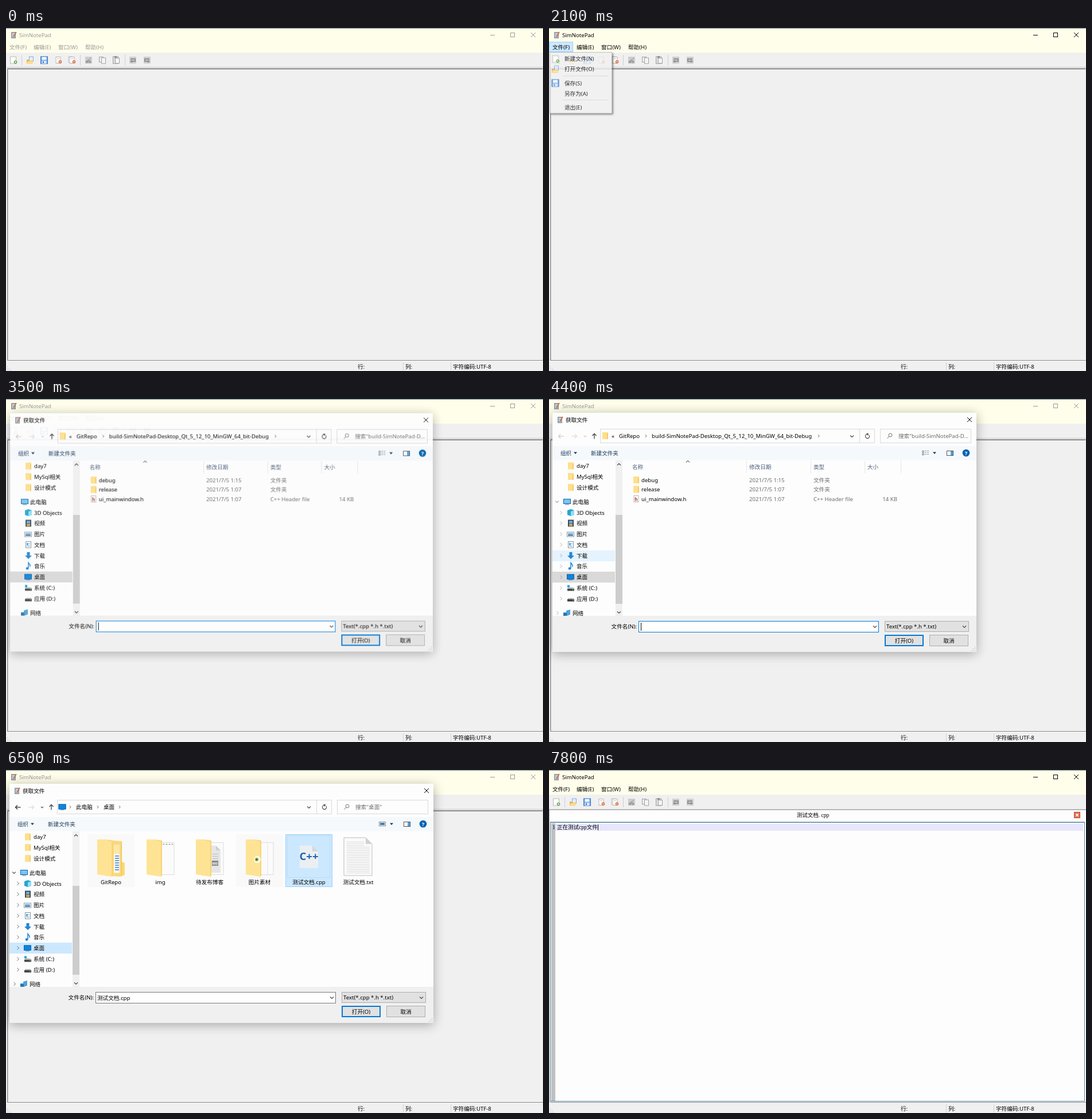
Write an HTML page with a canvas that moves like this. It is 936 px wide and 598 px high and loops after 8 s.

```html
<!DOCTYPE html>
<html lang="zh">
<head>
<meta charset="utf-8">
<title>SimNotePad</title>
<style>
html, body { margin: 0; width: 936px; height: 598px; overflow: hidden; background: #f0f0f0 }
canvas { position: absolute; left: 0; top: 0 }
#top { transform-origin: 375.5px 232.5px }
</style>
</head>
<body>
<canvas id="base" width="936" height="598"></canvas>
<canvas id="top" width="936" height="598"></canvas>
<script>
const base = document.getElementById('base').getContext('2d');
const top2d = document.getElementById('top').getContext('2d');
const UI = '9.6px "Noto Sans","Noto Sans CJK SC","Noto Sans CJK",sans-serif';
const EDIT = '9.5px "Liberation Serif","Noto Sans CJK SC","Noto Sans CJK",serif';
const BLUE = '#0078d7', GREY = '#6d6d6d';
let g = base;

// Drawing helpers
function box(x, y, w, h, fill, edge, lw = 1) {
  if (fill) { g.fillStyle = fill; g.fillRect(x, y, w, h); }
  if (edge) {
    g.strokeStyle = edge; g.lineWidth = lw;
    g.strokeRect(x + lw / 2, y + lw / 2, w - lw, h - lw);
  }
}
function path(pts) {
  g.beginPath();
  for (let i = 0; i < pts.length; i += 2) g.lineTo(pts[i], pts[i + 1]);
}
function line(color, lw, ...pts) {
  path(pts); g.strokeStyle = color; g.lineWidth = lw; g.stroke();
}
function poly(fill, ...pts) { path(pts); g.fillStyle = fill; g.fill(); }
function dot(x, y, r, fill, edge) {
  g.beginPath(); g.arc(x, y, r, 0, 7);
  if (fill) { g.fillStyle = fill; g.fill(); }
  if (edge) { g.strokeStyle = edge; g.lineWidth = 1; g.stroke(); }
}
// y is the visual middle of the line
function text(s, x, y, color = '#000', align = 'left', font = UI) {
  g.font = font; g.textAlign = align; g.fillStyle = color;
  g.fillText(s, x, y + 3.5);
}
function cross(x, y, r, color, lw = 1) {
  line(color, lw, x - r, y - r, x + r, y + r);
  line(color, lw, x + r, y - r, x - r, y + r);
}
const down = (x, y, c = '#444', r = 3) => line(c, 1.1, x - r, y - r / 2, x, y + r / 2, x + r, y - r / 2);
const up = (x, y, c = '#444', r = 3) => line(c, 1.1, x - r, y + r / 2, x, y - r / 2, x + r, y + r / 2);
const right = (x, y, c = '#555', r = 2.2) => line(c, 1, x - r / 2, y - r, x + r / 2, y, x - r / 2, y + r);
const triangle = (x, y) => poly('#1e395b', x - 3, y - 1.5, x + 3, y - 1.5, x, y + 2);
function arrow(x, y, dir, c) {
  line(c, 1.3, x - 4.5, y, x + 4.5, y);
  line(c, 1.3, x + dir, y - 3.5, x + dir * 4.5, y, x + dir, y + 3.5);
}

// Small icons, centred on x, y
function page(x, y, w = 9, h = 12, edge = '#b5b5b5', fill = '#fff') {
  box(x - w / 2, y - h / 2, w, h, fill, edge);
}
const badge = (x, y, c) => { dot(x, y, 2.8, c); box(x - 1.5, y - .5, 3, 1, '#fff'); };
function newIcon(x, y) {
  page(x - 1, y, 11, 13);
  badge(x + 3, y + 3.5, '#5fa548'); box(x + 2.5, y + 2, 1, 3, '#fff');
}
function openIcon(x, y) {
  page(x + 2, y - 2, 8, 9, '#82abe4', '#e3eeff');
  poly('#e9b64a', x - 6, y - 1, x - 2, y - 1, x - 1, y + 1, x + 6, y + 1, x + 4, y + 6, x - 6, y + 6);
  poly('#ffe18c', x - 4, y + 2, x + 6.5, y + 2, x + 4, y + 5.5, x - 6, y + 5.5);
}
function saveIcon(x, y) {
  box(x - 6.5, y - 6.5, 13, 13, '#6ba4ea', '#3d78c6');
  box(x - 4, y - 5.5, 8, 5, '#f2f7ff'); box(x - 4, y + 1, 8, 5, '#dbe8f8');
  box(x - 2.5, y + 2, 2, 3, '#3d78c6');
}
function closeIcon(x, y, two) {
  if (two) page(x - 3, y - 1, 7, 11);
  page(x, y, 9, 12);
  line('#c4c4c4', 1, x - 2, y - 2.5, x + 2, y - 2.5);
  badge(x + 3.5, y + 3, '#e4703c');
}
function greyIcon(x, y, kind) {
  const c = '#a2a2a2';
  if (kind == 'cut') {
    box(x - 6, y - 6, 12, 12, '#cdcdcd');
    line('#8c8c8c', 1, x - 3, y + 3, x + 4, y - 4); line('#999', 1, x + 3, y + 3, x - 2, y - 2);
    dot(x - 3, y + 3, 1.7, null, '#808080'); dot(x + 2, y + 3, 1.7, null, '#808080');
  } else if (kind == 'copy') {
    page(x - 2, y - 1, 8, 10, c, '#eee'); page(x + 2, y + 1, 8, 11, c, '#f5f5f5');
  } else if (kind == 'paste') {
    page(x - 1, y, 10, 13, c, '#dcdcdc'); box(x - 3, y - 7, 4, 3, '#909090');
    page(x + 2, y + 1, 8, 10, c, '#f5f5f5');
  } else {
    const d = kind == 'undo' ? 1 : -1;
    box(x - 6, y - 6, 12, 12, '#cfcfcf');
    line('#909090', 2, x - d * 4, y - 2, x + d * 4, y - 2, x + d * 4, y + 2, x - d * 2, y + 2);
    poly('#909090', x - d * 1, y - 1, x - d * 5, y + 2, x - d * 1, y + 5);
  }
}
function appIcon(x, y) {
  box(x - 4, y - 5, 8, 11, '#a3b3c1', '#8a949d');
  line('#fff', 1, x - 2, y - 1.5, x + 2, y - 1.5); line('#fff', 1, x - 2, y + 1.5, x + 2, y + 1.5);
  line('#d4683a', 1.6, x, y + 3, x + 5, y - 5);
}
function folder(x, y) {
  box(x - 5, y - 6, 10, 12, '#ffdf8b'); box(x + 3, y - 4, 2, 10, '#f3cc6a');
}
function screen(x, y, c = '#1283d9') {
  box(x - 6, y - 5, 13, 9, c, '#0867ad'); box(x - 3, y + 4.5, 7, 1, '#5e87a6');
}

// Main window
function windowFrame(t) {
  const active = t >= 2100 && t < 3200 || t >= 7500;
  const ink = active ? '#000' : '#999';
  g = base;
  box(0, 0, 936, 598, '#f0f0f0');
  box(0, 0, 936, 43, '#fffeea');
  box(0, 0, 936, 1, '#718b8f');
  appIcon(13, 12);
  text('SimNotePad', 23, 12, ink);
  box(844, 12, 8, 1, ink); box(879, 8, 8, 8, null, ink); cross(919, 12, 4, ink);
  if (t >= 1700 && t < 2100) box(0, 24, 42, 18, '#e5f3ff', '#cce8ff');
  if (t >= 2100 && t < 3200) box(0, 24, 42, 18, '#cce8ff', '#99d1ff');
  ['文件(F)', '编辑(E)', '窗口(W)', '帮助(H)'].forEach((s, i) => text(s, [6, 48, 91, 138][i], 33.5, ink));

  if (t >= 1300 && t < 1700) box(1, 44, 25, 23, '#e5f3ff', '#cce8ff');
  newIcon(13.5, 56); openIcon(42, 56); saveIcon(66.5, 56); closeIcon(91, 56); closeIcon(115, 56, true);
  ['cut', 'copy', 'paste', 'undo', 'redo'].forEach((k, i) => greyIcon([144, 168, 192, 221, 246][i], 56, k));
  for (const x of [27, 129, 207]) box(x, 47, 1, 18, '#cfcfcf');
  box(0, 68, 936, 1, '#c4c4c4'); box(0, 69, 936, 1, '#fafafa');

  if (t >= 7600) editor();
  else {
    box(2, 70, 934, 511, null, '#a0a0a0'); box(2, 71, 933, 1, '#747474');
    box(2, 71, 1, 509, '#858585'); box(3, 72, 1, 507, '#c4c4c4');
    box(935, 71, 1, 509, '#e3e3e3');
  }
  box(2, 579, 934, 1, '#858585'); box(0, 580, 936, 1, '#fafafa');
  box(692, 583, 1, 14, '#d2d2d2'); box(775, 583, 1, 14, '#d2d2d2');
  text('行:', 613, 590); text('列:', 696, 590); text('字符编码:UTF-8', 779, 590);
  for (const [x, y] of [[2, 590], [2, 593], [2, 596], [5, 593], [5, 596], [8, 596]]) box(x, y, 1, 1, '#aaa');
}
function editor() {
  box(0, 69, 936, 511, '#fdfdfd'); box(0, 69, 936, 1, '#a8a8a8'); box(0, 70, 1, 510, '#b5b5b5');
  text('测试文档. cpp', 460, 78.5, '#000', 'center', EDIT);
  box(915, 73, 11, 11, '#e0704f', '#b9553a'); cross(920.5, 78.5, 2.2, '#fff', 1.4);
  box(2, 90, 932, 1, '#a8b8c0'); box(2, 91, 932, 487, '#fdfdfd', '#4c86a5');
  box(4, 93, 7, 484, '#c0c0c0');
  box(11, 94, 920, 12, '#e8e6fd');
  text('1', 6, 99.5, '#000', 'left', EDIT);
  text('正在测试cpp文件', 14, 99.5, '#000', 'left', EDIT);
  box(85, 95, 1, 10, '#000');
}

function menu(t) {
  g.shadowColor = 'rgba(0,0,0,.5)'; g.shadowBlur = 3; g.shadowOffsetX = g.shadowOffsetY = 2;
  box(1, 42, 109, 107, '#f2f2f2');
  g.shadowColor = 'transparent';
  box(1, 42, 109, 107, null, '#b5b5b5');
  if (t >= 2400) box(2, t < 2900 ? 44 : 62, 105, 18, '#91c9f7');
  newIcon(12, 54); openIcon(11, 72); saveIcon(11, 96);
  ['新建文件(N)', '打开文件(O)', '保存(S)', '另存为(A)', '退出(E)'].forEach((s, i) => text(s, 27, [53, 71, 96, 114, 138.5][i]));
  box(24, 83, 80, 1, '#d7d7d7'); box(24, 125, 80, 1, '#d7d7d7');
}

// File dialog
const tree = [
  ['day7', 116.5], ['MySql相关', 135], ['设计模式', 154], ['此电脑', 179], ['3D Objects', 198], ['视频', 216.5], ['图片', 235.5],
  ['文档', 254], ['下载', 273], ['音乐', 291.5], ['桌面', 310.5], ['系统 (C:)', 329.5], ['应用 (D:)', 348], ['网络', 373]
];
function treeIcon(i, y) {
  if (i < 3) folder(38, y);
  else if (i == 3) screen(31, y, '#7cc4ec');
  else if (i == 4) {
    poly('#27a5cf', 32, y - 4, 38, y - 6, 44, y - 4, 44, y + 4, 38, y + 6, 32, y + 4);
    poly('#8fe0f5', 38, y - 2, 44, y - 4, 44, y + 4, 38, y + 6);
  } else if (i == 5) {
    box(33, y - 6, 10, 12, '#3a4b5c'); box(35, y - 4, 6, 4, '#6db2e8'); box(35, y + 1, 6, 4, '#d3a94c');
  } else if (i == 6) {
    box(31, y - 4, 13, 9, '#fff', '#8c9aa5'); box(33, y - 2, 9, 3, '#79bce8'); box(33, y + 1, 9, 2, '#37688c');
  } else if (i == 7) {
    page(38, y, 10, 12, '#8294a5'); box(35, y - 3, 3, 4, '#59a2d6');
    box(35, y + 2, 6, 1, '#59a2d6'); box(39, y - 2, 2, 1, '#59a2d6');
  } else if (i == 8) {
    poly('#2586d3', 35.5, y - 6, 40.5, y - 6, 40.5, y, 44, y, 38, y + 6, 32, y, 35.5, y);
  } else if (i == 9) {
    line('#1786d8', 1.5, 38, y + 4, 38, y - 6, 41, y - 2, 41, y + 1); dot(36, y + 4, 2.3, '#1786d8');
  } else if (i == 10) screen(37, y);
  else if (i < 13) {
    box(32, y + 1, 12, 4, '#444'); poly('#bbb', 34, y - 1, 42, y - 1, 44, y + 1, 32, y + 1);
    box(41, y + 2, 2, 1, '#6f6');
    if (i == 11) box(32, y - 5, 4, 4, '#1ba0e2');
  } else {
    poly('#4fa3d8', 25, y - 1, 30, y - 1, 30, y - 4, 37, y - 6, 37, y + 3, 31, y + 5, 25, y + 5);
    poly('#2a76aa', 25, y, 31, y, 31, y + 5, 25, y + 5);
  }
}
function hoverRow(t) {
  if (t < 4300 || t >= 5600) return -1;
  return t < 4400 ? 7 : t < 4500 ? 8 : t < 4600 ? 10 : t < 4800 ? 11 : t < 5000 ? 12 : t < 5100 ? 11 : 10;
}
function sidebar(t) {
  const hover = hoverRow(t);
  const chevron = t < 4300 || t >= 6900 ? 0 : t < 4500 ? .5 : t < 6600 ? 1 : (6900 - t) / 400;
  tree.forEach(([name, y], i) => {
    const row = i == 10 ? (t < 5100 || t >= 6600 ? '#d9d9d9' : '#cce8ff') : i == hover ? '#e5f3ff' : null;
    if (row) box(6, Math.round(y - 9.3), 109, 19, row, i == 10 && hover == 10 && t >= 5100 ? '#99d1ff' : null);
    treeIcon(i, y);
    text(name, i == 3 || i == 13 ? 41 : 48, y);
    if (i > 2) {
      g.globalAlpha = chevron;
      if (i == 3) down(14, y, '#444', 2.8); else right(i == 13 ? 15 : 21, y, '#666', 3);
      g.globalAlpha = 1;
    }
  });
}
function fileList() {
  const head = '#4c607a';
  ['名称', '修改日期', '类型', '大小'].forEach((s, i) => text(s, [145, 349, 461, 555][i], 118, head));
  for (const x of [344, 456, 550, 613]) box(x, 108, 1, 21, '#e5e5e5');
  up(242, 109, '#777');
  [['debug', '1:15', '文件夹'], ['release', '1:07', '文件夹'], ['ui_mainwindow.h', '1:07', 'C++ Header file']].forEach(([name, time, kind], i) => {
    const y = 141 + i * 16.5;
    if (i < 2) folder(152, y);
    else { page(152, y, 9, 12); text('h', 152, y, '#b33a3a', 'center', 'bold 8px "Noto Sans",sans-serif'); }
    text(name, 161, y); text('2021/7/5 ' + time, 349, y, GREY); text(kind, 461, y, GREY);
  });
  text('14 KB', 607, 174, GREY, 'right');
}
// An open folder: contents to the right, the yellow cover in front
function bigFolder(x, i) {
  if (i == 0) {
    poly('#fbd878', x + 14, 122, x + 43, 124, x + 43, 160, x + 48, 162, x + 48, 183, x + 40, 186, x + 14, 184);
    box(x + 29, 130, 10, 50, '#fbe7ab');
    box(x + 29, 146, 10, 33, '#f8fafc');
    for (let y = 149; y < 176; y += 4) box(x + 31, y, 7, 2, '#6b9ccb');
    line('#e9bd55', 1, x + 42.5, 126, x + 42.5, 184);
  } else {
    poly('#fbfbfb', x + 20, 125, x + 48, 127, x + 48, 182, x + 20, 184);
    line('#dcdcdc', 1, x + 24, 126.5, x + 48, 126.5, x + 48, 182.5, x + 24, 182.5);
    if (i == 1) {
      box(x + 26, 128, 22, 3, '#eee');
      for (let k = 0; k < 4; k++) box(x + 29 + k * 5, 129, 2, 1, '#888');
    }
    if (i == 2) {
      poly('#e6e6e6', x + 24, 132, x + 35, 132, x + 43, 140, x + 43, 179, x + 24, 179);
      poly('#cfcfcf', x + 35, 132, x + 43, 140, x + 35, 140);
      for (let y = 146; y < 157; y += 4) box(x + 29, y, 10, 1, '#bbb');
      box(x + 28, 158, 11, 9, '#8a8a8a');
      text('MD', x + 33.5, 161.5, '#fff', 'center', 'bold 5.5px "Noto Sans",sans-serif');
    }
    if (i == 3) line('#e4e4e4', 1, x + 38, 128, x + 38, 182);
  }
  poly('#ffe394', x, 121, x + 13, 121, x + 25, 124, x + 25, 186, x, 182);
  poly('#f7d375', x + 13, 121, x + 27, 123, x + 27, 184, x + 25, 186, x + 25, 125);
  if (i == 3) {
    dot(x + 20, 156, 6, '#fdfdfd'); dot(x + 19, 156, 3.2, '#9cb83a'); dot(x + 19, 156, 1.2, '#333');
  }
}
function thumbnails(t) {
  const hover = t < 5700 ? -1 : t < 5800 ? 2 : t < 6000 ? 3 : t < 6800 ? 4 : -1;
  ['GitRepo', 'img', '待发布博客', '图片素材', '测试文档.cpp', '测试文档.txt'].forEach((name, i) => {
    const x = Math.round(142 + i * 86.2), mid = x + 41;
    const picked = i == 4 && t >= 6500;
    if (picked) box(x, 112, 82, 92, '#cce8ff', hover == 4 ? '#99d1ff' : null);
    else if (i == 0 && t < 6500) box(x, 112, 82, 92, '#d9d9d9');
    else if (hover == i) box(x, 112, 82, 92, '#e5f3ff');
    else if ((i == 0 || i == 3) && t >= 6500 && t < 6600) box(x, 112, 82, 92, '#f9f9f9');
    if (i < 4) bigFolder(x + 17, i);
    if (i == 4) {
      box(x + 3, 114, 75, 74, picked ? null : '#fff', picked ? '#bcdcf2' : '#e2e2e2');
      poly('#eceff1', x + 25, 132, x + 47, 132, x + 57, 142, x + 57, 171, x + 25, 171);
      poly('#d3d8dc', x + 47, 132, x + 57, 142, x + 47, 142);
      text('C++', mid, 153.5, '#1f63ad', 'center', 'bold 18.5px "Noto Sans",sans-serif');
    }
    if (i == 5) {
      path([x + 16, 118, x + 54, 118, x + 65, 129, x + 65, 184, x + 16, 184, x + 16, 118]);
      g.fillStyle = '#fafafa'; g.fill(); g.strokeStyle = '#bdbdbd'; g.lineWidth = 1; g.stroke();
      poly('#d2d2d2', x + 54, 118, x + 65, 129, x + 54, 129);
      for (let y = 125; y < 180; y += 3) box(x + 21, y, y < 132 ? 30 : 40, 1, '#dcdcdc');
    }
    text(name, mid, 195.5, '#000', 'center');
  });
}
function dialog(t) {
  const desktop = t >= 5300, loaded = t >= 3500;
  g.shadowColor = 'rgba(0,0,0,.32)'; g.shadowBlur = 18; g.shadowOffsetX = 0; g.shadowOffsetY = 3;
  box(6, 24, 739, 417, '#fdfdfd');
  g.shadowColor = 'transparent';
  box(6, 82, 739, 25, '#f5f9fc');
  box(6, 378, 739, 63, '#f0f0f0');
  appIcon(19, 36); text('获取文件', 29, 36); cross(733, 36, 4, '#000');

  arrow(21, 65, -1, desktop ? '#333' : '#ccc'); arrow(44, 65, 1, '#ddd');
  down(63, 65, desktop ? '#555' : '#ccc', 2);
  line('#444', 1.3, 79, 69.5, 79, 60.5); line('#444', 1.3, 75.5, 64, 79, 60.5, 82.5, 64);
  box(89, 52, 453, 25, '#fdfdfd', '#d9d9d9'); box(541, 52, 27, 25, '#fdfdfd', '#d9d9d9'); box(577, 52, 159, 25, '#fdfdfd', '#d9d9d9');
  down(528, 65);
  g.beginPath(); g.arc(555, 65, 3.5, -.6, 4.6); g.strokeStyle = '#444'; g.lineWidth = 1.2; g.stroke();
  poly('#444', 553, 60, 557, 60, 556, 64);
  dot(595, 63, 3, null, '#777'); line('#777', 1, 593, 65, 589.5, 69);
  if (loaded) {
    if (desktop) {
      screen(97.5, 64.5);
      right(112, 64.5); text('此电脑', 122, 64); right(160, 64.5); text('桌面', 170, 64);
      if (t >= 5500) right(198, 64.5);
    } else {
      folder(98, 64);
      text('«', 109, 64); text('GitRepo', 122, 64); right(169, 64.5);
      text('build-SimNotePad-Desktop_Qt_5_12_10_MinGW_64_bit-Debug', 179, 64); right(470, 64.5);
    }
    text(desktop ? '搜索"桌面"' : '搜索"build-SimNotePad-D...', 609, 64.5, GREY);
  }

  text('组织', 20, 94, '#1e395b'); triangle(46, 94); text('新建文件夹', 73, 94, '#1e395b');
  if (desktop) { box(650, 90, 12, 8, '#fff', '#888'); box(652, 92, 8, 4, '#3a7db4'); }
  else for (let i = 0; i < 3; i++) { box(650, 90 + i * 3, 4, 2, '#8c9aaa'); box(655, 90 + i * 3, 3, 1, '#999'); box(659, 90 + i * 3, 3, 1, '#999'); }
  triangle(672, 94);
  box(693, 90, 12, 9, '#fff', '#555'); box(700, 91, 4, 7, '#4ba3e3');
  dot(727, 94, 6.3, '#0063b1'); text('?', 727, 94, '#fff', 'center', 'bold 9.6px "Noto Sans",sans-serif');

  g.save(); g.beginPath(); g.rect(6, 107, 739, 271); g.clip();
  if (loaded) {
    sidebar(t);
    if (desktop) { if (t >= 5400) thumbnails(t); } else fileList();
  }
  box(116, 107, 12, 271, '#f0f0f0'); box(116, 202, 12, 155, '#cdcdcd');
  up(122, 114); down(122, 372);
  g.restore();

  text('文件名(N):', 153, 396.5, '#000', 'right');
  box(156, 387, 419, 20, '#fff', t < 5600 ? BLUE : '#7a7a7a');
  if (t >= 6500) text('测试文档.cpp', 159, 397);
  if (loaded && t < 3900 || t >= 4400 && t < 4800) box(160, 390, 1, 14, '#000');
  down(568, 397);
  box(585, 387, 147, 19, '#e1e1e1', '#adadad'); text('Text(*.cpp *.h *.txt)', 588, 396.5); down(724, 397);
  box(585, 411, 68, 20, t >= 7000 ? '#e5f1fb' : '#e1e1e1', BLUE, t >= 7000 ? 1 : 2); text('打开(O)', 619, 421, '#000', 'center');
  box(663, 411, 68, 20, '#e1e1e1', '#adadad'); text('取消', 697, 421, '#000', 'center');
  for (let i = 0; i < 3; i++) for (let k = 0; k <= i; k++) box(742 - k * 3, 432 + i * 3, 1, 1, '#aaa');
}

// Opacity and zoom of the floating layer
function layer(t) {
  if (t < 2100) return [0, 1];
  if (t < 3200) return [t < 2200 ? .8 : 1, 1];
  if (t < 3300) return [0, 1];
  if (t < 3600) return [[.12, .6, .93][(t - 3300) / 100], [.958, .985, .997][(t - 3300) / 100]];
  if (t < 7400) return [1, 1];
  return t < 7500 ? [.6, .975] : t < 7600 ? [.12, .945] : [0, 1];
}
let shown = -1;
function frame(now) {
  const t = Math.floor(now % 8000 / 100) * 100;
  if (t != shown) {
    shown = t;
    windowFrame(t);
    g = top2d;
    g.clearRect(0, 0, 936, 598);
    const [alpha, zoom] = layer(t);
    if (alpha) (t < 3200 ? menu : dialog)(t);
    g.canvas.style.opacity = alpha;
    g.canvas.style.transform = `scale(${zoom})`;
  }
  requestAnimationFrame(frame);
}
requestAnimationFrame(frame);
</script>
</body>
</html>
```
